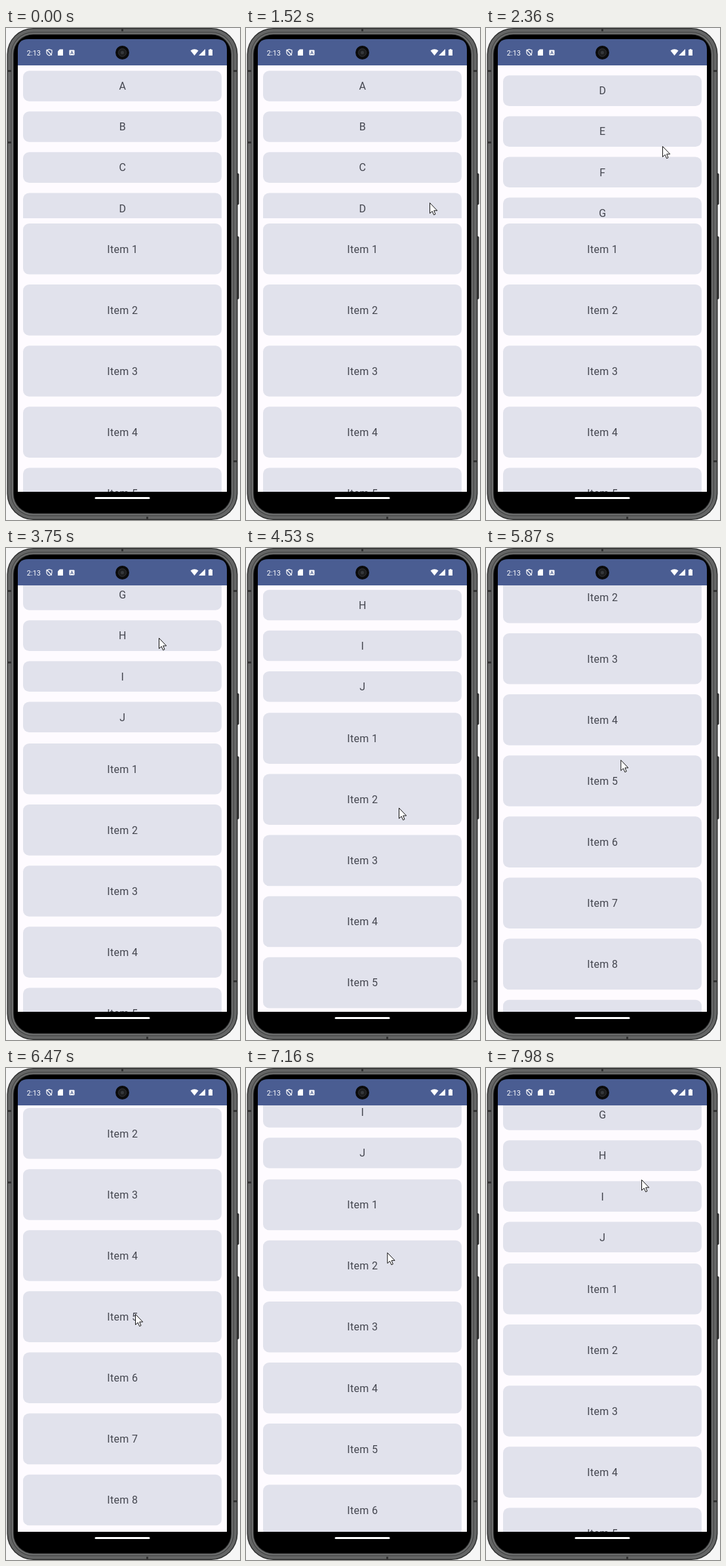
An HTML page for the animation above (8000 ms loop, 357x750 px).

```html
<!DOCTYPE html>
<html lang="en">
<head>
<meta charset="utf-8">
<title>Nested scrolling lists</title>
<style>
  html, body { margin: 0; width: 100%; height: 100%; overflow: hidden; background: #f6f6f6; }
  svg { display: block; }
  text { font-family: Roboto, sans-serif; }
  .label { font-size: 16px; letter-spacing: .3px; fill: #44464f; text-anchor: middle; }
  .card { fill: #e1e2ec; }
</style>
</head>
<body>
<svg width="357" height="750" viewBox="0 0 357 750">
  <defs>
    <clipPath id="page"><rect x="18" y="57" width="319" height="650"/></clipPath>
    <clipPath id="inset"><rect x="18" y="57" width="319" height="233"/></clipPath>
  </defs>

  <!-- side buttons and body -->
  <g fill="#3a3b3b" stroke="#1c1c1c">
    <rect x="350.5" y="222" width="4.500" height="47" rx="1"/>
    <rect x="350.5" y="318" width="4.500" height="95" rx="1"/>
  </g>
  <g id="body"></g>
  <path d="M2 65.500H8M2 174.500H8M347 65.500H353M347 660.500H353M177.500 0V5M215.500 745V750" stroke="#333" stroke-width="3"/>

  <!-- screen -->
  <path d="M18 57V33Q18 17 34 17H321Q337 17 337 33V57Z" fill="#4a5d92"/>
  <path d="M18 57H337V707H18Z" fill="#fefbff"/>
  <rect x="135.500" y="715" width="84" height="3" rx="1.500" fill="#fff"/>

  <g clip-path="url(#page)">
    <g id="outer">
      <g clip-path="url(#inset)"><g id="inner"></g></g>
    </g>
  </g>

  <!-- status bar -->
  <text x="31.800" y="41.500" font-size="11" fill="#fff">2:13</text>
  <g fill="#fff">
    <path d="M66 32.500L70 34V37Q70 40.500 66 42Q62 40.500 62 37V34ZM62 33L70 41.500" fill="none" stroke="#fff" stroke-width="1.200"/>
    <path d="M82 32.500H87V42H79V35.500Z"/>
    <rect x="96.500" y="33.500" width="8" height="8" rx="1"/>
    <path d="M98.500 40L100.500 35L102.500 40M99.200 38.500H101.800" fill="none" stroke="#4a5d92"/>
    <path d="M281.500 34.500Q287.500 30 293.500 34.500L287.500 42Z"/>
    <path d="M304 32V42H294Z"/>
    <path d="M309 33H310.700V32H313.300V33H315V42H309Z"/>
  </g>
  <circle cx="177.500" cy="37.500" r="10.500" fill="#0b0b0c"/>
  <circle cx="177.500" cy="37.500" r="6" fill="#1d1e20" stroke="#303134"/>
  <circle cx="177.500" cy="37.500" r="2.500" fill="#35373b"/>

  <path id="cursor" d="M.5 .5V16.500L4.200 13.200L6.600 18.800L9 17.700L6.700 12.200H11.700Z" fill="#fff" stroke="#111" stroke-linejoin="round"/>
</svg>
<script>
const $ = id => document.getElementById(id);
const outer = $('outer'), inner = $('inner'), cursor = $('cursor');
const DP = 0.776, LOOP = 8000, START = 1240;

// Concentric shells of the phone: inset and colour.
const shells = [[0, '#2e2f2f'], [1.5, '#646565'], [6, '#3e3f3f'], [7, '#6c6d6d'], [9.5, '#262727'], [10.5, '#000']];
for (const [d, color] of shells) {
  $('body').insertAdjacentHTML('beforeend',
    `<rect x="${1.5 + d}" y="${d}" width="${352 - 2 * d}" height="${750 - 2 * d}" rx="${40 - d}" fill="${color}"/>`);
}

function addCard(parent, label, top, height) {
  parent.insertAdjacentHTML('beforeend',
    `<rect class="card" x="26" y="${top}" width="303" height="${height}" rx="9.300"/>
     <text class="label" x="177.800" y="${top + height / 2 + 5.8}">${label}</text>`);
}
[...'ABCDEFGHIJ'].forEach((c, i) => addCard(inner, c, 65.2 + i * 80 * DP, 60 * DP));
for (let i = 0; i < 12; i++) addCard(outer, 'Item ' + (i + 1), 298 + i * 120 * DP, 100 * DP);

// Waypoints: time in ms, then values.
const pageScroll = [[4240, 0], [4530, 46.4], [5390, 249], [6080, 400], [6470, 330.4], [7600, 0]];
const pointer = [[1240, 337, 238], [1580, 268, 272], [1740, 269, 272], [2360, 269, 180], [3750, 233, 136],
  [4140, 233, 473], [4240, 233, 473], [4530, 233, 396], [5390, 212, 281], [6470, 197, 375], [7980, 237, 170]];

const clamp = u => Math.min(1, Math.max(0, u));

function along(path, t) {
  const i = Math.max(1, path.findIndex(p => p[0] > t));
  const next = t < path.at(-1)[0] ? i : path.length - 1;
  const [t0, ...from] = path[next - 1], [t1, ...to] = path[next];
  const u = clamp((t - t0) / (t1 - t0));
  return from.map((v, k) => v + (to[k] - v) * u);
}

function letterScroll(t) {
  const u = clamp((t - 1720) / 1780);
  return 389.4 * (1 - (1 - u) ** 1.38);
}

function move(el, x, y) {
  el.setAttribute('transform', `translate(${x} ${y})`);
}

function draw(t) {
  move(inner, 0, -letterScroll(t));
  move(outer, 0, -along(pageScroll, t)[0]);
  move(cursor, ...along(pointer, t));
  cursor.setAttribute('visibility', t < START ? 'hidden' : 'visible');
}

const begin = performance.now();
function tick() {
  draw((performance.now() - begin) % LOOP);
  requestAnimationFrame(tick);
}
tick();
</script>
</body>
</html>
```
